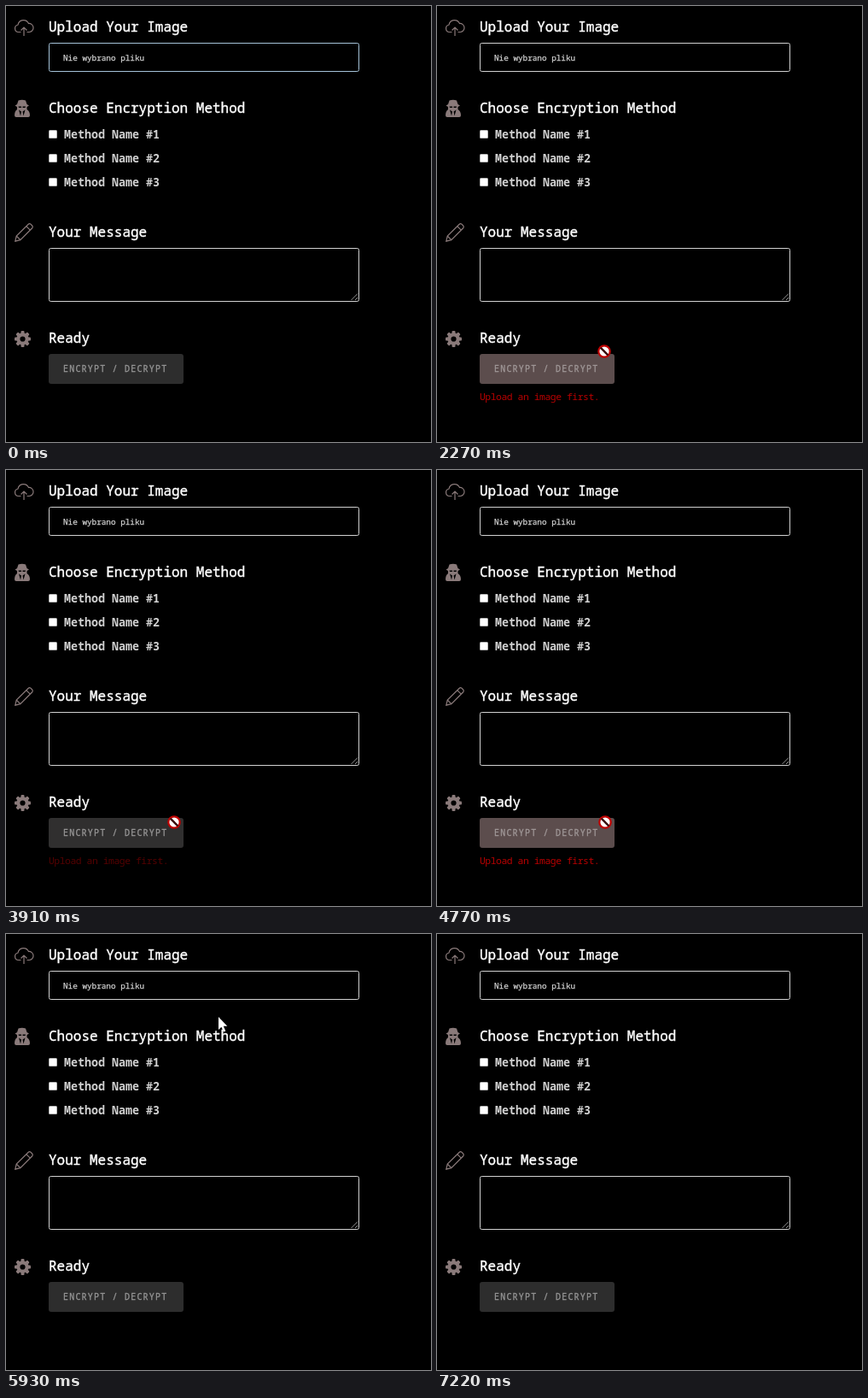
An HTML page with a canvas for the animation above (8 s loop, 498 px wide and 510 px high).

```html
<!DOCTYPE html>
<html lang="en">
<head>
<meta charset="utf-8">
<title>Encryption form</title>
<style>
html, body { margin: 0; width: 100%; height: 100%; overflow: hidden; background: #000; }
canvas { display: block; }
</style>
</head>
<body>
<canvas id="stage" width="498" height="510"></canvas>
<script>
const ctx = document.getElementById("stage").getContext("2d", { alpha: false });
const LOOP = 8000;
const FADE = 550;
const MONO = '"Noto Sans Mono", "DejaVu Sans Mono", monospace';
const ICON = "#8a7a7a";

const clamp = v => Math.max(0, Math.min(1, v));
const mix = (a, b, k) => a + (b - a) * k;
const mixColor = (a, b, k) => `rgb(${a.map((v, i) => Math.round(mix(v, b[i], k))).join(",")})`;

const steady = p => p;
const speedUp = n => p => p ** n;
const slowDown = n => p => 1 - (1 - p) ** n;

// Each glide of the pointer; bend bows the path vertically
const glides = [
  { start: 280, end: 1020, from: [444, 497], to: [296, 420], bend: -18, pace: speedUp(2) },
  { start: 1120, end: 1600, from: [296, 420], to: [179, 416], bend: 0, pace: slowDown(2) },
  { start: 2230, end: 3030, from: [179, 416], to: [304, 328], bend: 0, pace: slowDown(2.7) },
  { start: 3370, end: 3910, from: [304, 328], to: [197, 412], bend: 0, pace: speedUp(1.5) },
  { start: 4770, end: 5570, from: [197, 412], to: [304, 200], bend: 50, pace: speedUp(3.85) },
  { start: 5670, end: 6450, from: [304, 200], to: [140, 58], bend: -65, pace: steady },
  { start: 6490, end: 6670, from: [140, 58], to: [25, 54], bend: 0, pace: steady }
];

// Hover intervals: enter, leave
const hintHover = [[400, 2400], [3720, 5340]];
const buttonHover = [[1360, 2285], [3880, 5205]];
const inputHover = [[6010, 6640]];

// Close to the CSS "ease" curve
const ease = p => mix(slowDown(3)(p), p * p * (3 - 2 * p), 0.6);

function hoverLevel(spans, t) {
  return clamp(spans.reduce((sum, [enter, leave]) =>
    sum + ease(clamp((t - enter) / FADE)) - ease(clamp((t - leave) / FADE)), 0));
}

function pointerAt(t) {
  const glide = glides.findLast(g => g.start <= t);
  if (!glide || t > glides.at(-1).end) return null;
  const { start, end, from, to, bend, pace } = glide;
  const k = pace(clamp((t - start) / (end - start)));
  return [
    Math.round(mix(from[0], to[0], k)),
    Math.round(mix(from[1], to[1], k) + bend * Math.sin(Math.PI * k))
  ];
}

function text(str, x, y, { size, color, weight = 400, spacing = 0, thicken = 0 }) {
  ctx.font = `${weight} ${size}px ${MONO}`;
  ctx.letterSpacing = spacing + "px";
  ctx.fillStyle = ctx.strokeStyle = color;
  ctx.fillText(str, x, y);
  if (!thicken) return;
  ctx.lineWidth = thicken;
  ctx.strokeText(str, x, y);
}

function roundRect(x, y, w, h, r) {
  ctx.beginPath();
  ctx.roundRect(x, y, w, h, r);
}

function disc(x, y, r, color) {
  ctx.beginPath();
  ctx.arc(x, y, r, 0, Math.PI * 2);
  ctx.fillStyle = color;
  ctx.fill();
}

function box(x, y, w, h, color) {
  roundRect(x + 0.5, y + 0.5, w - 1, h - 1, 2);
  ctx.strokeStyle = color;
  ctx.lineWidth = 1;
  ctx.stroke();
}

function strokePath(d, color, width) {
  ctx.strokeStyle = color;
  ctx.lineWidth = width;
  ctx.stroke(new Path2D(d));
}

function fillPath(d, color) {
  ctx.fillStyle = color;
  ctx.fill(new Path2D(d));
}

function cloudIcon() {
  strokePath("M17.5 30.5H14.5A4.3 4.3 0 0 1 14 22A6.6 6.6 0 0 1 26.5 20.5" +
    "A5 5 0 0 1 27.5 30.5H24.5M21 35V25M17.5 28.5L21 25L24.5 28.5", ICON, 1.2);
}

function agentIcon() {
  fillPath("M13 115L14.5 110.5Q19 109 23 110.5L24.5 115L27 116.5L24.5 118V121" +
    "Q28 123 28 128Q28 130 26 130H12Q10 130 10 128Q10 123 13 121V118L10.5 116.5Z", ICON);
  fillPath("M14.5 117.5H18V119H15ZM19.5 117.5H23L22.5 119H19.5Z" +
    "M15 121.5L18 123.5L17 128.5ZM22.5 121.5L19.5 123.5L20.5 128.5Z", "#000");
}

function pencilIcon() {
  strokePath("M10.8 275.2L12.2 269L26.2 255.2Q27.5 254 29 255.2L30.7 257" +
    "Q32 258.4 30.7 259.8L16.8 273.6ZM12.2 269L16.8 273.6M23.8 257.6L28.3 262.2", ICON, 1.2);
}

function gearIcon() {
  ctx.save();
  ctx.translate(19.5, 389.5);
  disc(0, 0, 7.2, ICON);
  for (let i = 0; i < 8; i++) {
    roundRect(-2, -9.5, 4, 5, 1);
    ctx.fill();
    ctx.rotate(Math.PI / 4);
  }
  disc(0, 0, 3.1, "#000");
  ctx.restore();
}

function checkbox(y) {
  roundRect(50, y, 10, 10, 1.5);
  ctx.fillStyle = "#b5b5b5";
  ctx.fill();
  ctx.fillStyle = "#fff";
  ctx.fillRect(51, y + 1, 8, 8);
}

function arrow(x, y) {
  ctx.save();
  ctx.translate(x, y);
  fillPath("M0 1V16L3.4 12.8L6 18.5L8.3 17.5L5.8 11.8H10.3Z", "#fff");
  ctx.restore();
}

function forbidden(x, y) {
  disc(x, y, 7.8, "#c00000");
  disc(x, y, 5.6, "#fff");
  strokePath(`M${x - 4.3} ${y - 4.3}L${x + 4.3} ${y + 4.3}`, "#3a0000", 2.4);
}

function drawUpload(t) {
  cloudIcon();
  const glow = t < 20 ? 0.75 : hoverLevel(inputHover, t);
  box(50, 43, 364, 34, mixColor([209, 209, 209], [150, 190, 220], glow));
  text("Nie wybrano pliku", 67, 64, { size: 9.33, color: "#d0d0d0", thicken: 0.25 });
}

function drawMethods() {
  agentIcon();
  for (let i = 0; i < 3; i++) {
    const y = 145 + 28 * i;
    checkbox(y);
    text("Method Name #" + (i + 1), 68, y + 10, { size: 13.33, color: "#d1d1d1", weight: 700 });
  }
}

function drawMessage() {
  pencilIcon();
  box(50, 283, 364, 63, "#d1d1d1");
  strokePath("M404.5 344L412 336.5M409 344L412 341", "#999", 1);
}

function drawReady(t) {
  gearIcon();
  const heat = hoverLevel(buttonHover, t);
  roundRect(50, 407, 158, 35, 3);
  ctx.fillStyle = mixColor([45, 45, 45], [92, 77, 77], heat);
  ctx.fill();
  text("ENCRYPT / DECRYPT", 67, 428, {
    size: 10, spacing: 1.2, thicken: 0.3,
    color: mixColor([150, 150, 150], [160, 152, 152], heat)
  });
  ctx.globalAlpha = hoverLevel(hintHover, t);
  text("Upload an image first.", 50, 461, { size: 11.4, spacing: -0.46, color: "#b80000" });
  ctx.globalAlpha = 1;
}

function drawPointer(t) {
  const pos = pointerAt(t);
  if (!pos) return;
  const [x, y] = pos;
  const onButton = x >= 50 && x < 208 && y >= 404 && y < 442;
  (onButton ? forbidden : arrow)(x, y);
}

function draw(t) {
  ctx.fillStyle = "#000";
  ctx.fillRect(0, 0, 498, 510);
  const title = { size: 16, color: "#fff", thicken: 0.4 };
  text("Upload Your Image", 50, 30, title);
  text("Choose Encryption Method", 50, 125, title);
  text("Your Message", 50, 270, title);
  text("Ready", 50, 394, title);
  drawUpload(t);
  drawMethods();
  drawMessage();
  drawReady(t);
  drawPointer(t);
}

const start = performance.now();
function tick() {
  draw((performance.now() - start) % LOOP);
  requestAnimationFrame(tick);
}
tick();
</script>
</body>
</html>
```
